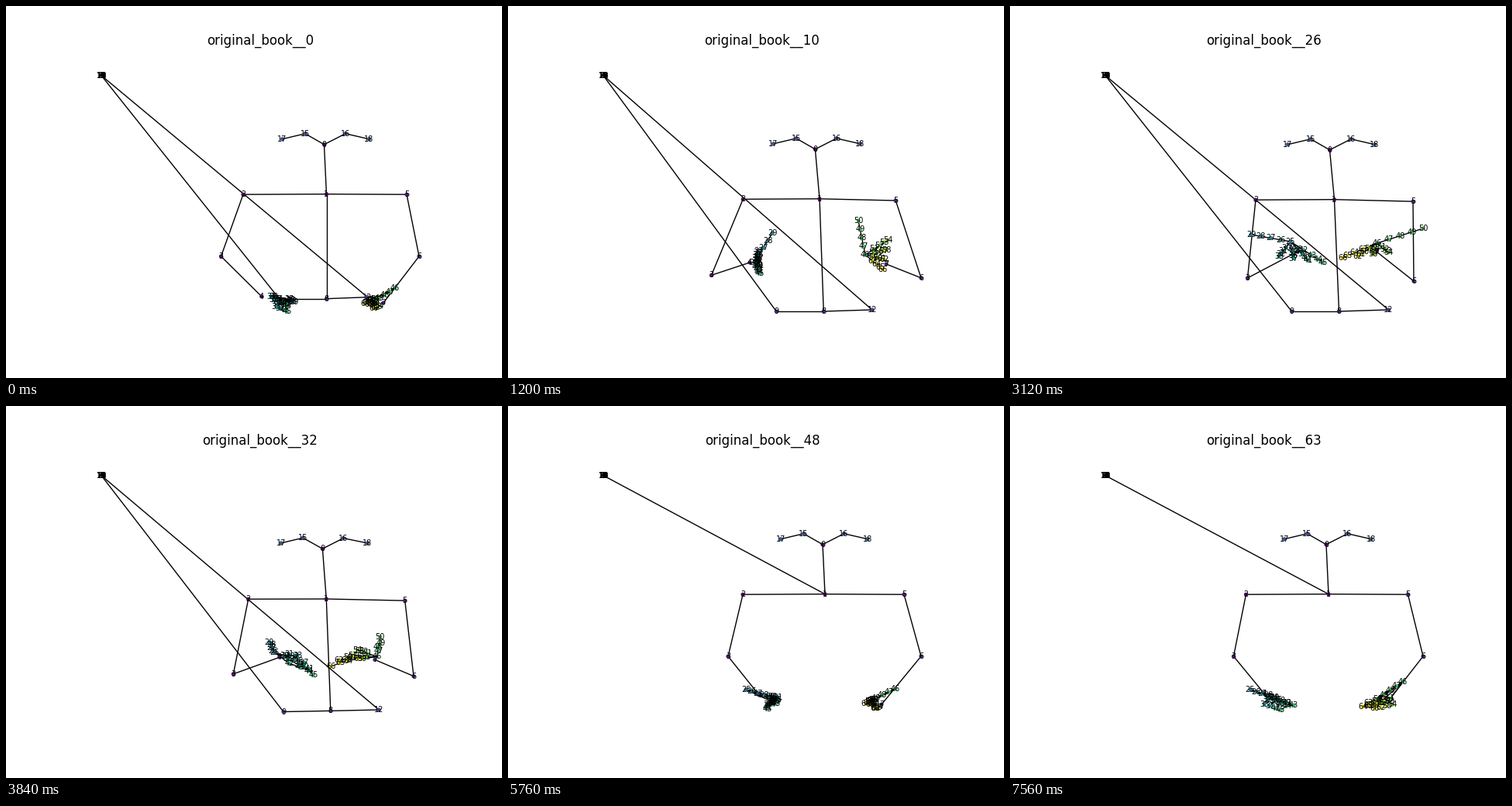
These frames come from a looping animation (640x480 px, 7.68 s). A matplotlib script:

```python
import numpy as np
import matplotlib.pyplot as plt
from matplotlib.animation import FuncAnimation
from matplotlib.collections import LineCollection

FRAMES, INTERVAL = 64, 120
NODES = 67
CORNER = (123, 89.7)        # undetected joints collapse here
LIMIT = (533, 395)
HIPS = [8, 9, 12]
HIPS_LOST = 45              # hips are undetected from here on
RIGHT, LEFT = 25, 46        # first joint of each hand

EDGES = [(0, 1), (1, 2), (2, 3), (3, 4), (1, 5), (5, 6), (6, 7), (1, 8),
         (8, 9), (9, 10), (8, 12), (12, 13), (0, 15), (15, 17), (0, 16), (16, 18)]
for root in (RIGHT, LEFT):
    for first in range(root + 1, root + 21, 4):
        EDGES += [(root, first)] + [(j, j + 1) for j in range(first, first + 3)]

# joint positions along a finger, stretched and folded into a fist
STRAIGHT = np.array([0.4, 0.65, 0.85, 1])
FIST = np.array([0.85, 1, 0.85, 0.7])
DROOP = np.array([0, 0, 4, 12])


def hand(curl, root, thumb, index, pinky):
    """Wrist, thumb and four fingers fanned from index to pinky."""
    root, thumb, index, pinky = np.array([root, thumb, index, pinky], float)
    along = STRAIGHT + curl * (FIST - STRAIGHT)
    pts = [root] + [root + t * (thumb - root) for t in (0.25, 0.5, 0.75, 1)]
    for k in range(4):
        tip = index + (pinky - index) * k / 3
        pts += [root + t * (tip - root) + (0, curl * d) for t, d in zip(along, DROOP)]
    return pts


def pose(lift, neck_x, width, elbow, wrists, right, left, reach=533):
    """All joints; lift goes from 0 (arms down) to 1 (forearms raised)."""
    pts = np.tile(np.array(CORNER, float), (NODES, 1))
    neck = np.array([neck_x, 242.7 + 7 * lift])
    nose = neck + (-3 - 3 * lift, -64)
    hip = np.array([neck_x + 6 * lift, min(377.7 + 35 * lift, 394)])
    skew = 2 * (1 - lift)
    pts[0], pts[1], pts[8] = nose, neck, hip
    pts[2] = neck + (-width - skew, 0.5)
    pts[5] = neck + (width - skew, 0.5 + 2 * lift)
    pts[3] = elbow, 323 + 28 * lift
    pts[6] = reach, 323 + 32 * lift
    pts[4], pts[7] = wrists
    pts[9] = hip + (-61, 0)
    pts[12] = hip + (53 + 11 * lift, -2)
    pts[15], pts[16] = nose + (-24.5, -14), nose + (27.5, -14)
    pts[17], pts[18] = nose + (-54, -7), nose + (58, -7)
    curl = max(0, 1 - 2 * lift)
    pts[RIGHT:LEFT] = hand(curl, *right)
    pts[LEFT:] = hand(curl, *left)
    return pts


KEYS = {
    0: pose(0, 413.5, 105.5, 277.5, [(330, 375), (487, 383)],
            [(365, 378), (371, 382), (342, 375), (362, 384)],
            [(502, 364), (475, 382), (472, 380), (463, 384)]),
    10: pose(0.87, 402, 98.5, 262.5, [(312, 331), (488, 333)],
             [(318, 331), (341, 293), (323, 316), (325, 345)],
             [(461, 321), (452, 277), (490, 302), (484, 340)]),
    17: pose(1, 423.5, 103, 310, [(362, 311), (478, 319)],
             [(373, 304), (319, 289), (363, 329), (423, 332)],
             [(463, 310), (508, 268), (508, 269), (490, 272)]),
    26: pose(1, 418.5, 101.5, 306.5, [(371, 317), (473, 317)],
             [(362, 304), (311, 295), (347, 323), (404, 331)],
             [(474, 306), (533, 287), (488, 318), (429, 325)], reach=521),
    39: pose(0.58, 408, 100.5, 276.5, [(330, 333), (480, 340)],
             [(328, 337), (376, 315), (414, 323), (390, 366)],
             [(483, 344), (421, 312), (405, 313), (410, 348)]),
    48: pose(0, 409, 104, 284, [(324, 373), (482, 385)],
             [(307, 366), (338, 375), (348, 376), (346, 384)],
             [(500, 365), (466, 381), (469, 381), (462, 384)]),
    63: pose(0, 411, 104.5, 288.5, [(328, 371), (487, 382)],
             [(310, 366), (341, 376), (336, 376), (366, 386)],
             [(507, 356), (474, 378), (488, 381), (455, 388)]),
}
TIMES = list(KEYS)

# detector wobble, stronger in the hands and absent at undetected joints
wobble = np.random.default_rng(4).normal(size=(FRAMES, NODES, 2))
wobble[:, :RIGHT] *= 0.35
wobble[:, [10, 11, 13, 14, *range(19, 25)]] = 0


def joints(i):
    k = min(np.searchsorted(TIMES, i, side="right"), len(TIMES) - 1)
    a, b = TIMES[k - 1], TIMES[k]
    t = (i - a) / (b - a)
    ease = t * t * (3 - 2 * t)
    pts = KEYS[a] + (KEYS[b] - KEYS[a]) * ease
    pts += wobble[i] * np.sin(np.pi * t)
    if i >= HIPS_LOST:
        pts[HIPS] = CORNER
    return np.minimum(pts, LIMIT)


fig = plt.figure(figsize=(6.4, 4.8), dpi=100, facecolor="white")
ax = fig.add_axes([0.125, 0.11, 0.775, 0.77])
ax.set_xlim(80, 576)
ax.set_ylim(427.2, 57.6)
ax.axis("off")
title = ax.set_title("", fontsize=12, fontfamily="DejaVu Sans")

start = joints(0)
bones = LineCollection([], colors="black", linewidths=1.0, zorder=1)
ax.add_collection(bones, autolim=False)
dots = ax.scatter(start[:, 0], start[:, 1], s=5, c=np.arange(NODES),
                  cmap="viridis", linewidths=1.5, zorder=2)
labels = [ax.text(x, y, str(n), fontsize=7, fontfamily="DejaVu Sans",
                  ha="center", va="center", zorder=3)
          for n, (x, y) in enumerate(start)]


def draw(i):
    pts = joints(i)
    bones.set_segments([pts[[a, b]] for a, b in EDGES])
    dots.set_offsets(pts)
    for label, p in zip(labels, pts):
        label.set_position(p)
    title.set_text(f"original_book__{i}")
    return [bones, dots, title, *labels]


anim = FuncAnimation(fig, draw, frames=FRAMES, interval=INTERVAL,
                     repeat=True, repeat_delay=0, blit=False)
plt.show()
```
